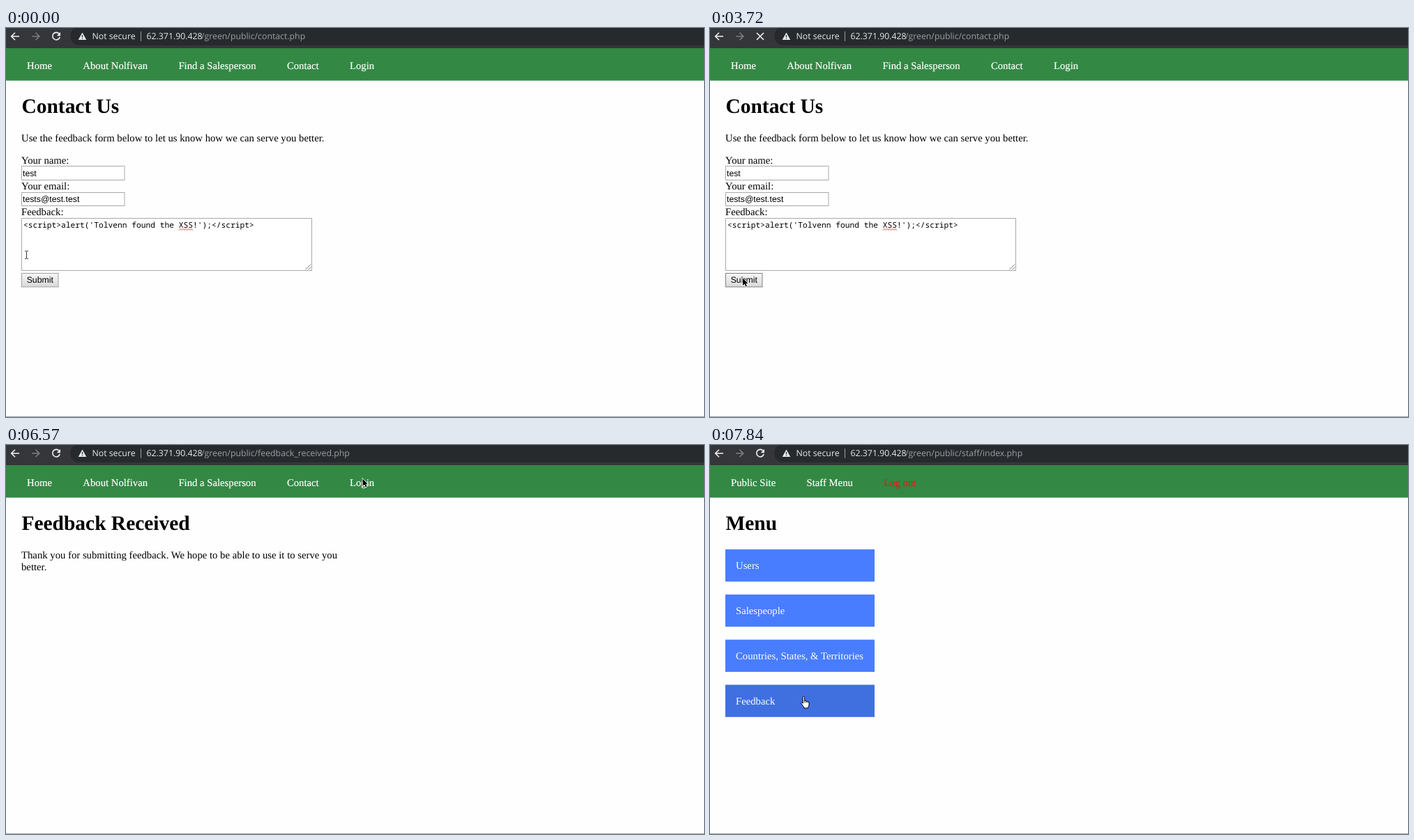
Recreate the animation shown at these times as an HTML page. Size 1001 px wide and 559 px high, loop 7990 ms.

```html
<!DOCTYPE html>
<html lang="en">
<head>
<meta charset="utf-8">
<title>Feedback form</title>
<style>
html, body { margin: 0; height: 100%; overflow: hidden; background: #fefefe; }
svg { display: block; text-rendering: geometricPrecision; }
text { font: 14.72px "Liberation Serif", "Times New Roman", serif; }
.title { font-size: 29.44px; font-weight: bold; }
.field { font: 12.27px "Liberation Sans", Arial, sans-serif; }
.code { font: 11.26px "Noto Sans Mono", "DejaVu Sans Mono", monospace; white-space: pre; }
.bar text { font: 12.3px "Open Sans", "Noto Sans", sans-serif; fill: #e8eaed; }
.bar .path { fill: #9aa0a6; }
.icon { fill: none; stroke: #f1f3f4; stroke-width: 1.6; }
.icon.off { stroke: #7b7e82; }
.nav { fill: #fff; stroke: #fff; stroke-width: .2; }
.nav .out { fill: #f11; stroke: #f11; }
.box { fill: #fff; stroke: #a9a9a9; }
.menu text { fill: #fff; }
.menu .title { fill: #000; }
.menu rect { fill: #497dff; }
.menu .on { fill: #4070e0; }
#button { fill: url(#up); stroke: #a0a0a0; }
#button.hover { stroke: #808080; }
#button.press { fill: url(#down); stroke: #707070; }
</style>
</head>
<body>
<svg width="1001" height="559" viewBox="0 0 1001 559">
  <defs>
    <linearGradient id="up" x2="0" y2="1"><stop stop-color="#f7f7f7"/><stop offset="1" stop-color="#d9d9d9"/></linearGradient>
    <linearGradient id="down" x2="0" y2="1"><stop stop-color="#d6d6d6"/><stop offset="1" stop-color="#f2f2f2"/></linearGradient>
  </defs>
  <rect width="1001" height="559" fill="#fefefe"/>
  <path d="M0 558.5H1001" stroke="#a4a4a4"/>

  <g class="bar">
    <rect width="1001" height="29" fill="#35363a"/>
    <rect x="92" y="-2" width="960" height="27" rx="13.5" fill="#272a2d"/>
    <path id="back" class="icon" d="M19 12H8M13 6.7 7.7 12 13 17.3"/>
    <path class="icon off" d="M37 12H48M42.500 6.700 47.800 12 42.500 17.300"/>
    <g id="reload">
      <path class="icon" d="M76.200 8.300A5.300 5.300 0 1 0 77.200 13"/>
      <path d="M78 6V11.200H72.800Z" fill="#f1f3f4"/>
    </g>
    <path id="stop" class="icon" d="M67 7 77 17M77 7 67 17"/>
    <path d="M109.500 6.500 115.300 17H103.700Z" fill="#e8eaed"/>
    <path d="M109.500 10V13.300M109.500 14.300V15.600" stroke="#272a2d" stroke-width="1.3"/>
    <text x="123.500" y="16.300">Not secure</text>
    <path d="M193.500 5V19" stroke="#9aa0a6"/>
    <text x="201.500" y="16.300">62.371.90.428</text>
    <text id="path" class="path" x="280" y="16.300"></text>
  </g>

  <rect y="29" width="1001" height="46.600" fill="#338844"/>
  <text id="publicNav" class="nav" x="30" y="58.500"></text>
  <text id="staffNav" class="nav" x="30" y="58.500"></text>

  <g id="contact">
    <text class="title" x="22.500" y="122">Contact Us</text>
    <text x="22" y="163">Use the feedback form below to let us know how we can serve you better.</text>
    <text x="22" y="195">Your name:</text>
    <rect class="box" x="22.500" y="198.500" width="147.500" height="20"/>
    <text class="field" x="24" y="212.500">test</text>
    <text x="22" y="232.300">Your email:</text>
    <rect class="box" x="22.500" y="236.500" width="147.500" height="19"/>
    <text class="field" x="24" y="249.500">tests@test.test</text>
    <text x="22" y="269.300">Feedback:</text>
    <rect class="box" x="22.500" y="273.500" width="416" height="75"/>
    <text class="code" x="25" y="287">&lt;script&gt;alert('Tolvenn found the XSS!');&lt;/script&gt;</text>
    <path d="M248 290.500l2-2 2 2 2-2 2 2 2-2 2 2 2-2 2 2 2-2 2 2" fill="none" stroke="#f04040"/>
    <path d="M429.500 347 437 339.500M433.500 347 437 343.500" stroke="#777"/>
    <rect id="button" x="22.500" y="352.500" width="52.500" height="19.500"/>
    <text class="field" x="29.700" y="366">Submit</text>
  </g>

  <g id="thanks">
    <text class="title" x="22.500" y="122">Feedback Received</text>
    <text x="22" y="163">Thank you for submitting feedback. We hope to be able to use it to serve you</text>
    <text x="22" y="180">better.</text>
  </g>

  <g id="menu" class="menu"><text class="title" x="22.500" y="122">Menu</text></g>

  <path id="ibeam" d="M-2.500-5.500H-.8L0-5 .8-5.500H2.500M0-5V5M-2.500 5.500H-.8L0 5 .8 5.500H2.500" fill="none" stroke="#333"/>
  <g id="arrow">
    <path transform="scale(.92)" d="M0 0V11.500L2.700 9 4.600 13 6.400 12.200 4.600 8.400H8Z" stroke="#fff" stroke-width="1.600" paint-order="stroke"/>
  </g>
  <g id="hand" fill="#fff" stroke="#000" stroke-linejoin="round">
    <path d="M3.200 10.800V2a1.200 1.200 0 0 1 2.400 0V7q2-.8 2.300.8 2-.6 2.200.8 1.900-.4 1.900 1.200v3q0 2-1.200 3.200V17.500H4.600V16Q3.500 14.500 1 11.200q-.8-1.300.3-1.800 1-.3 1.900 1.400Z"/>
    <path d="M5.600 7V10M7.900 7.800V10M10.100 8.600V10" fill="none" stroke-width=".8"/>
  </g>
</svg>
<script>
const LOOP = 7990, STEP = 130;
const $ = id => document.getElementById(id);
const show = (id, on) => $(id).style.display = on ? '' : 'none';
const within = (v, from, to) => v >= from && v < to;

function add(parent, tag, attrs, text = '') {
  const el = document.createElementNS('http://www.w3.org/2000/svg', tag);
  for (const key in attrs) el.setAttribute(key, attrs[key]);
  el.textContent = text;
  return $(parent).appendChild(el);
}

function fillNav(id, labels) {
  labels.forEach((label, i) => add(id, 'tspan',
    { dx: i ? 44.3 : 0, class: label === 'Log out' ? 'out' : '' }, label));
}
fillNav('publicNav', ['Home', 'About Nolfivan', 'Find a Salesperson', 'Contact', 'Login']);
fillNav('staffNav', ['Public Site', 'Staff Menu', 'Log out']);

const PITCH = 64.85;
const blocks = ['Users', 'Salespeople', 'Countries, States, & Territories', 'Feedback'].map((label, i) => {
  const y = 150 + PITCH * i;
  const block = add('menu', 'rect', { x: 22, y, width: 214, height: 46.3 });
  add('menu', 'text', { x: 37, y: y + 28 }, label);
  return block;
});

// Pointer moves: first step, last step, x, y
const moves = [
  [150, 280, 58, 359], [420, 420, 69.5, 410], [570, 720, 110, 407], [840, 1370, 65.5, 416.5],
  [1770, 2040, 47, 374], [2190, 2310, 47, 366], [2460, 2590, 47, 378], [2710, 2860, 47, 359.5],
  [4850, 4970, 510, 122], [5260, 5380, 537, 82], [5500, 5770, 508, 48], [6180, 6300, 505, 42],
  [6570, 6570, 511.5, 48.5], [7270, 7390, 185.5, 269.5], [7540, 7840, 130, 360.5]
];

// The pointer slows slightly towards each stop and is redrawn in even steps
function pointerAt(t) {
  let x = 29.5, y = 326;
  for (const [from, to, endX, endY] of moves) {
    if (t < from) break;
    const count = Math.round((to - from) / STEP) + 1;
    const gap = (to - from) / (count - 1) || 1;
    const done = Math.min(1, (Math.floor((t - from) / gap) + 1) / count) ** 0.8;
    x += (endX - x) * done;
    y += (endY - y) * done;
  }
  return [x, y];
}

function draw(t) {
  const page = t < 4580 ? 'contact' : t < 6710 ? 'thanks' : 'menu';
  for (const id of ['contact', 'thanks', 'menu']) show(id, id === page);
  show('publicNav', page !== 'menu');
  show('staffNav', page === 'menu');
  $('path').textContent = '/green/public/' +
    { contact: 'contact', thanks: 'feedback_received', menu: 'staff/index' }[page] + '.php';

  const loading = within(t, 3720, 4580);
  show('stop', loading);
  show('reload', !loading);

  const pointer = t < 150 ? 'ibeam' : within(t, 5770, 6570) || t >= 7390 ? 'hand' : 'arrow';
  const [x, y] = pointerAt(t);
  for (const id of ['ibeam', 'arrow', 'hand']) show(id, id === pointer);
  $(pointer).setAttribute('transform', `translate(${x} ${y})`);

  const hover = within(y, 352, 372) && x < 75;
  $('button').setAttribute('class', within(t, 3430, 3720) ? 'press' : hover ? 'hover' : '');
  const active = pointer === 'hand' ? Math.floor((y - 140) / PITCH) : -1;
  blocks.forEach((block, i) => block.setAttribute('class', i === active ? 'on' : ''));
}

const start = performance.now();
function tick() {
  draw((performance.now() - start) % LOOP);
  requestAnimationFrame(tick);
}
tick();
</script>
</body>
</html>
```
